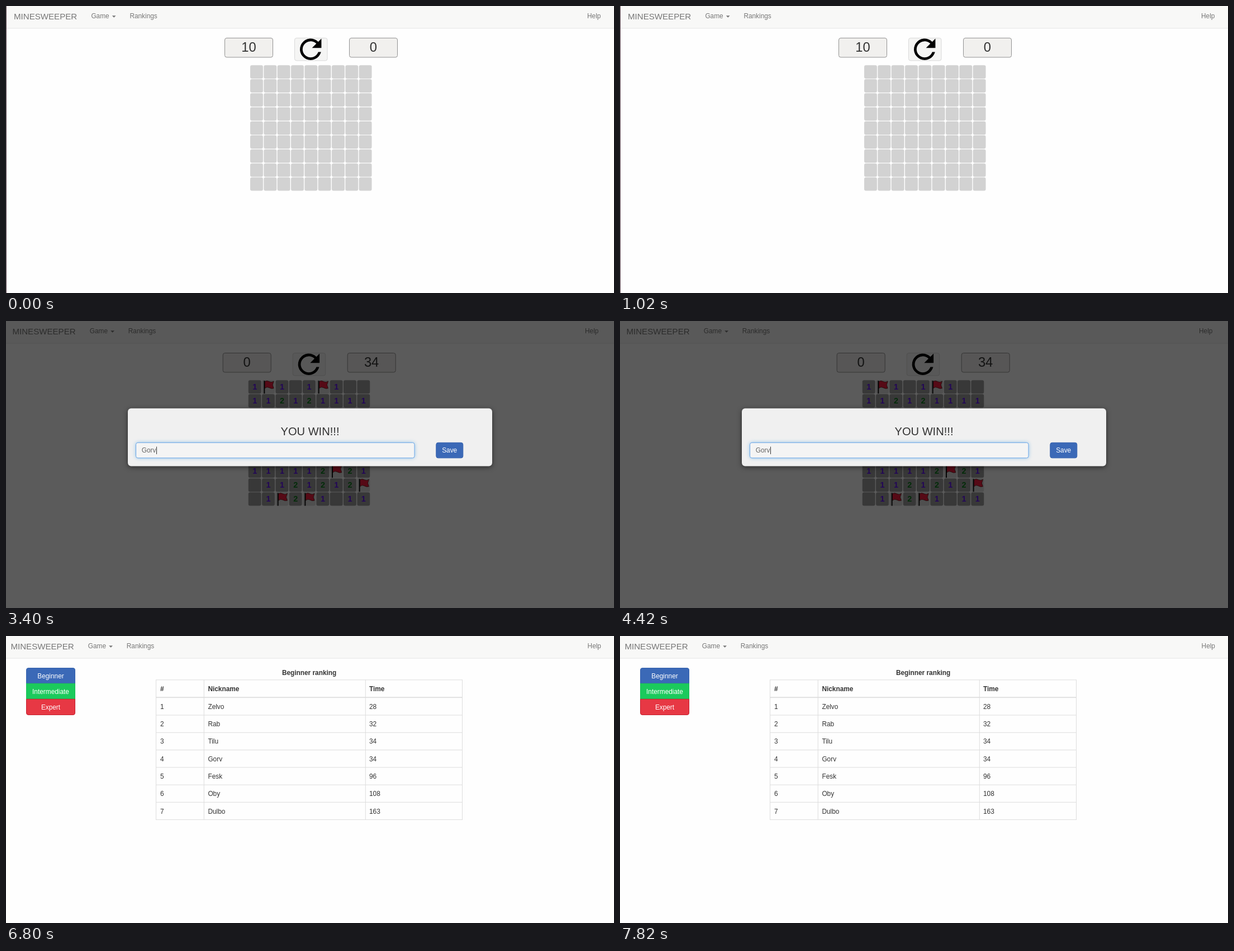
Write an HTML page that moves like this. It is 1088x515 px and loops after 8500 ms.

```html
<!DOCTYPE html>
<html lang="en">
<head>
<meta charset="utf-8">
<title>Minesweeper</title>
<style>
  html, body { margin: 0; width: 100%; height: 100%; overflow: hidden; background: #fefefe; }
  svg { display: block; width: 1088px; height: 515px; }
  text { font: 11.85px "Liberation Sans", Arial, sans-serif; fill: #333; white-space: pre; }
  .mid { text-anchor: middle; }
  .bold { font-weight: bold; }
  .nav text { fill: #777; }
  .nav .brand { font-size: 15.1px; }
  .counter { font-size: 23.7px; }
  .digit { font-size: 14.4px; font-weight: bold; text-anchor: middle; }
  .title { font-size: 20.1px; text-anchor: middle; }
  .light { fill: #fff; text-anchor: middle; }
  .glow { filter: drop-shadow(0 0 3px #66afe9aa); }
  .modal { filter: drop-shadow(0 2px 4px #0008); }
</style>
</head>
<body>
<svg id="stage" viewBox="0 0 1088 515"></svg>
<script>
const LOOP = 8500;
const CELL = { w: 22.9, h: 24, dx: 24.33, dy: 25.17 };
const DIGIT_COLORS = { 1: '#5f0df5', 2: '#087a18', 3: '#f01414' };

const rect = (x, y, w, h, fill, extra = '') =>
  `<rect x="${x}" y="${y}" width="${w}" height="${h}" fill="${fill}" ${extra}/>`;
const text = (x, y, str, cls = '', extra = '') =>
  `<text x="${x}" y="${y}" class="${cls}" ${extra}>${str}</text>`;
const path = (d, attrs) => `<path d="${d}" ${attrs}/>`;
const group = (x, y, body, cls = '') =>
  `<g transform="translate(${x} ${y})" class="${cls}">${body}</g>`;

function navbar(x, y, helpX) {
  return rect(0, 0, 1088, 39.5 + y, '#f8f8f7') + rect(0, 39.5 + y, 1088, 1, '#e5e5e5') +
    group(0, y,
      text(x - 138.4, 23.5, 'MINESWEEPER', 'brand') +
      text(x, 22.4, 'Game') +
      path(`M${x + 37.4} 17.3h6.8l-3.4 3.4z`, 'fill="#777"') +
      text(x + 69, 22.4, 'Rankings') +
      text(helpX, 22.4, 'Help'), 'nav');
}

function counter(x, value) {
  return rect(x + .5, .5, 86, 34.5, '#f1f0ee', 'rx="3.5" stroke="#929292"') +
    text(x + 43.4, 25.2, value, 'counter mid');
}

function toolbar(x, y, mines, seconds) {
  const arrow = 'M17.65 6.35A8 8 0 1 0 19.73 14h-2.08A6 6 0 1 1 16.22 7.78L13 11h7V4z';
  return group(x, y,
    counter(0, mines) + counter(223, seconds) +
    rect(125.5, .5, 58.5, 40.5, '#f5f5f4', 'rx="3.5" stroke="#d9d9d9"') +
    path(arrow, 'transform="translate(125.4 -8.1) scale(2.4)"'));
}

const flag =
  path('M5 2.5Q9 0 13 2.5T21 2L19 8.5L21 14.5Q17 16 13 13.5T5 14.5Z',
    'fill="#ef1c3c" stroke="#511" stroke-width=".8"') +
  rect(3.3, 1, 2, 23, '#111');

// '.' is covered, '0' is open and empty, 'F' is flagged
function board(x, y, size, rows, focus) {
  let out = '';
  for (let r = 0; r < size; r++) {
    for (let c = 0; c < size; c++) {
      const state = (rows[r] || '')[c] || '.';
      const open = state >= '0' && state <= '9';
      const fill = open ? '#9b9b9b' : state === 'F' ? '#dcdcdc' : '#d2d2d2';
      let body = rect(0, 0, CELL.w, CELL.h, fill, 'rx="3"');
      if (state === 'F') body += flag;
      if (open && state !== '0')
        body += text(CELL.w / 2 + .1, 16.8, state, 'digit', `style="fill:${DIGIT_COLORS[state]}"`);
      if (focus && focus[0] === c && focus[1] === r)
        body += rect(.5, .5, CELL.w - 1, CELL.h - 1, 'none', 'rx="1" stroke="#8484d8"');
      out += group(x + c * CELL.dx, y + r * CELL.dy, body);
    }
  }
  return out;
}

function winDialog() {
  return rect(0, 0, 1088, 515, '#000', 'opacity=".64"') +
    rect(218, 156.7, 652, 103.8, '#f0f0f0', 'rx="6" class="modal"') +
    text(544, 205.3, 'YOU WIN!!!', 'title') +
    rect(232.5, 218.3, 498.5, 27.5, '#f4f4f4', 'rx="3.5" stroke="#6aa5e6" class="glow"') +
    text(242.8, 236.2, 'Gorv', '', 'style="fill:#666"') +
    rect(269, 225.5, 1, 13.5, '#333') +
    rect(769.8, 218.3, 48, 27.5, '#3b69b7', 'rx="3.5" stroke="#3562ad"') +
    text(793.7, 236.2, 'Save', 'light');
}

function levelButtons() {
  const first = 'M36.5 85.2V61q0-3.5 3.5-3.5h80q3.5 0 3.5 3.5v24.2z';
  const last = 'M36.5 113.3V138q0 3.5 3.5 3.5h80q3.5 0 3.5-3.5V113.3z';
  return path(first, 'fill="#3b69b7" stroke="#3562ad"') +
    rect(36.5, 85.3, 87, 28, '#1bca5c', 'stroke="#1bbd57"') +
    path(last, 'fill="#e73844" stroke="#c5202f"') +
    ['Beginner', 'Intermediate', 'Expert']
      .map((name, i) => text(80, 76 + i * 28, name, 'light')).join('');
}

function rankingTable() {
  const scores = [['Zelvo', 28], ['Rab', 32], ['Tilu', 34], ['Gorv', 34],
    ['Fesk', 96], ['Oby', 108], ['Dulbo', 163]];
  const columns = [276, 361.4, 650];
  const row = (y, cells, cls) => cells.map((s, i) => text(columns[i], y, s, cls)).join('');
  let lines = 'M268 78.8H817M268.5 78.8V330M354.3 78.8V330M643.3 78.8V330M816.5 78.8V330';
  let out = text(542.6, 70.2, 'Beginner ranking', 'bold mid') +
    row(98.8, ['#', 'Nickname', 'Time'], 'bold');
  scores.forEach(([name, time], i) => {
    out += row(130.9 + i * 31.27, [i + 1, name, time]);
    lines += `M268 ${142 + i * 31.27}H817`;
  });
  return path(lines, 'fill="none" stroke="#ddd"') + rect(268, 109.4, 549, 1.7, '#ddd') + out;
}

const opened = ['.10002...', '.10013...', '11001....', '000012...', '000001...',
  '00000111.', '00000001.', '01111111.', '01.......'];
const solved = ['1F101F100', '112121111', ...Array(4).fill('000000000'),
  '111112F21', '01121212F', '01F2F1011'];
const intermediate = ['...100001', '.111000012', '.100000001', '.100000001', '.100001111',
  '.111001F11', '...10022', '...2101', '....222', '..........2'];

const scenes = [
  navbar(152.4, 0, 1040) + toolbar(391, 57, 10, 0) + board(437, 106.2, 9, []) +
    rect(0, 0, 1, 515, '#65505a'),
  navbar(151, 1, 1039) + toolbar(389.7, 58, 10, 17) + board(435.6, 107.2, 9, opened, [3, 3]),
  navbar(149.8, 0, 1036) + toolbar(387.7, 57, 0, 34) + board(433.7, 106.2, 9, solved) + winDialog(),
  navbar(147, -1.5, 1037.3) + toolbar(386.4, 55.5, 39, 28) +
    board(347.4, 105, 16, intermediate, [7, 6]),
  navbar(146.8, 0, 1040.6) + levelButtons() + rankingTable()
];

// Opaque scenes are stacked; each one appears at its own time and covers the earlier ones.
document.getElementById('stage').innerHTML = scenes.map((body, i) =>
  `<g id="scene${i}">${rect(0, 0, 1088, 515, '#fefefe')}${body}</g>`).join('');

const style = document.createElement('style');
style.textContent = scenes.map((_, i) => i === 0 ? '' : `
  @keyframes show${i} { 0% { visibility: hidden } ${i * 100 / scenes.length}%, 100% { visibility: visible } }
  #scene${i} { animation: show${i} ${LOOP}ms step-end infinite }`).join('');
document.head.append(style);
</script>
</body>
</html>
```
